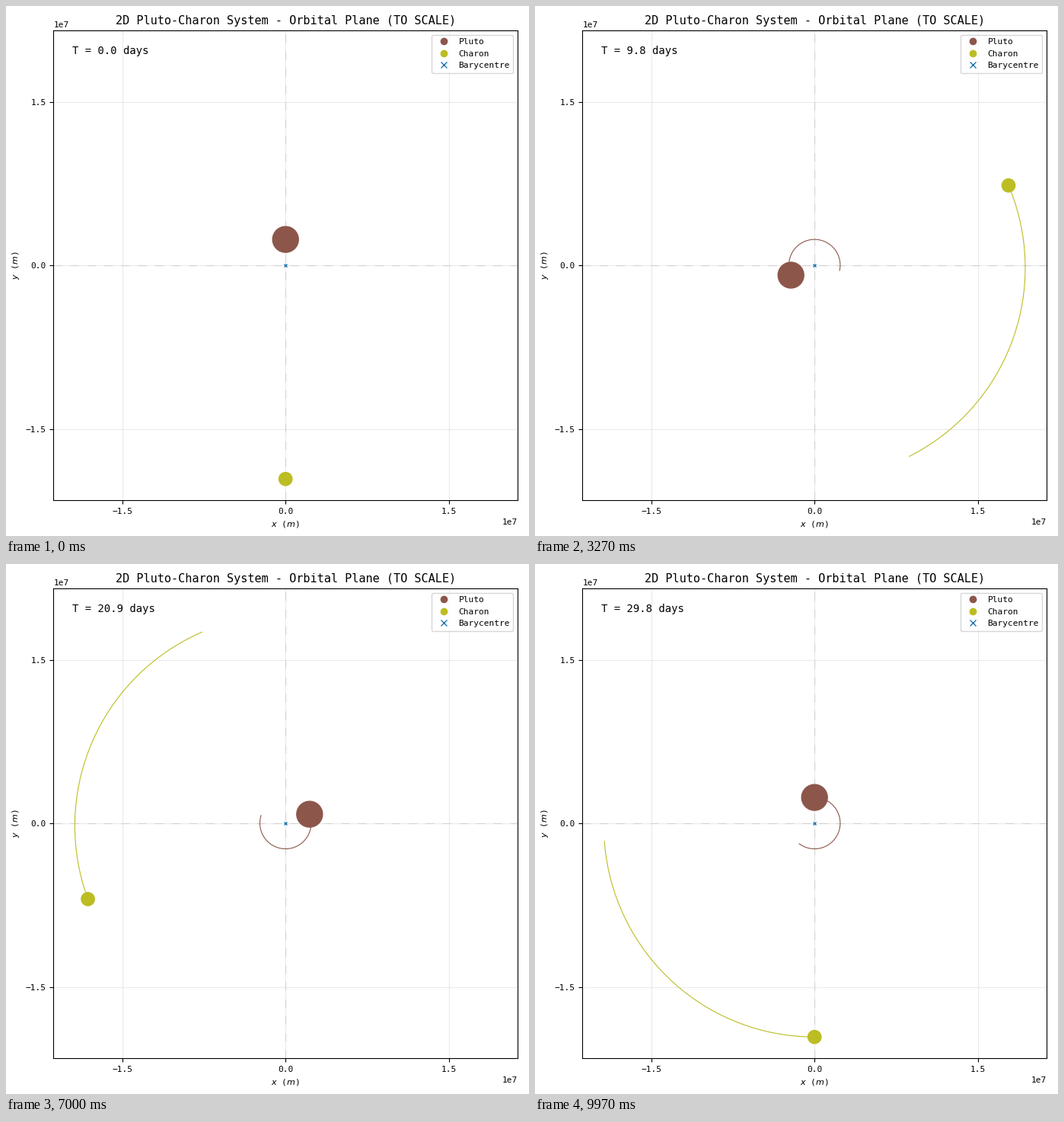
These frames come from a looping animation (687x695 px, 10 s). A matplotlib script:

```python
import numpy as np
import matplotlib.pyplot as plt
from matplotlib.animation import FuncAnimation
from matplotlib.lines import Line2D

W, H, DPI = 687, 695, 100
LOOP_MS, TICK_MS = 10000, 20
SHOWN = 330                      # distinct pictures in one loop
STEPS = 600                      # orbit samples over four periods
DAYS = 29.81

MASS_RATIO = 0.1217
CHARON_FAR = 1.9596e7            # greatest distance from the barycentre, m
ECC = 0.0115
PLUTO_R, CHARON_R = 1.1883e6, 6.06e5
PLUTO_TRAIL, CHARON_TRAIL = 90, 36
BROWN, OLIVE, BLUE = "C5", "C8", "C0"

plt.rcParams["font.family"] = "DejaVu Sans Mono"
plt.rcParams["font.size"] = 8


def charon_orbit():
    """Kepler orbit that starts at the far point, straight down."""
    mean = np.pi + np.linspace(0, 8 * np.pi, STEPS)
    ecc_anom = mean.copy()
    for _ in range(8):
        ecc_anom = mean + ECC * np.sin(ecc_anom)
    a = CHARON_FAR / (1 + ECC)
    along = a * (np.cos(ecc_anom) - ECC)
    across = a * np.sqrt(1 - ECC**2) * np.sin(ecc_anom)
    return np.column_stack([-across, along])


charon_path = charon_orbit()
pluto_path = -MASS_RATIO * charon_path
days = np.linspace(0, DAYS, STEPS)

fig = plt.figure(figsize=(W / DPI, H / DPI), dpi=DPI, facecolor="white")
left, right, top, bottom = 62.4, 672.0, 32.2, 648.2
ax = fig.add_axes([left / W, 1 - bottom / H, (right - left) / W, (bottom - top) / H])

half_y = 1.1 * CHARON_FAR
half_x = half_y * (right - left) / (bottom - top)
ax.set_xlim(-half_x, half_x)
ax.set_ylim(-half_y, half_y)
ax.set_xticks([-1.5e7, 0, 1.5e7])
ax.set_yticks([-1.5e7, 0, 1.5e7])
ax.grid(alpha=0.25)
for draw_axis in (ax.axhline, ax.axvline):
    draw_axis(0, color="lightgrey", lw=0.8, ls=(0, (10, 10)))
ax.set_title("2D Pluto-Charon System - Orbital Plane (TO SCALE)", fontsize=11)
ax.set_xlabel("$x$ ($m$)")
ax.set_ylabel("$y$ ($m$)")


def add_body(radius, color):
    disc = ax.add_patch(plt.Circle((0, 0), radius, color=color, zorder=4))
    trail, = ax.plot([], [], color=color, lw=0.8, zorder=3)
    return disc, trail


pluto = add_body(PLUTO_R, BROWN)
charon = add_body(CHARON_R, OLIVE)
ax.plot(0, 0, "x", color=BLUE, ms=3, zorder=3)
clock = ax.text(0.04, 0.95, "", transform=ax.transAxes, fontsize=10)


def key(marker, color, label):
    return Line2D([], [], ls="", marker=marker, color=color, label=label)


ax.legend(
    handles=[key("o", BROWN, "Pluto"), key("o", OLIVE, "Charon"), key("x", BLUE, "Barycentre")],
    loc="upper right",
)


def place(body, path, step, length):
    disc, trail = body
    disc.center = path[step]
    trail.set_data(*path[max(0, step - length):step + 1].T)


def update(i):
    # The picture changes on a 10 ms clock, 330 times per loop.
    shown = (i * TICK_MS + 15) * SHOWN // LOOP_MS
    step = -(-shown * STEPS // SHOWN)
    place(pluto, pluto_path, step, PLUTO_TRAIL)
    place(charon, charon_path, step, CHARON_TRAIL)
    clock.set_text(f"T = {days[step]:.1f} days")
    return (*pluto, *charon, clock)


anim = FuncAnimation(fig, update, frames=LOOP_MS // TICK_MS, interval=TICK_MS,
                     repeat=True, repeat_delay=0, blit=False)
plt.show()
```
